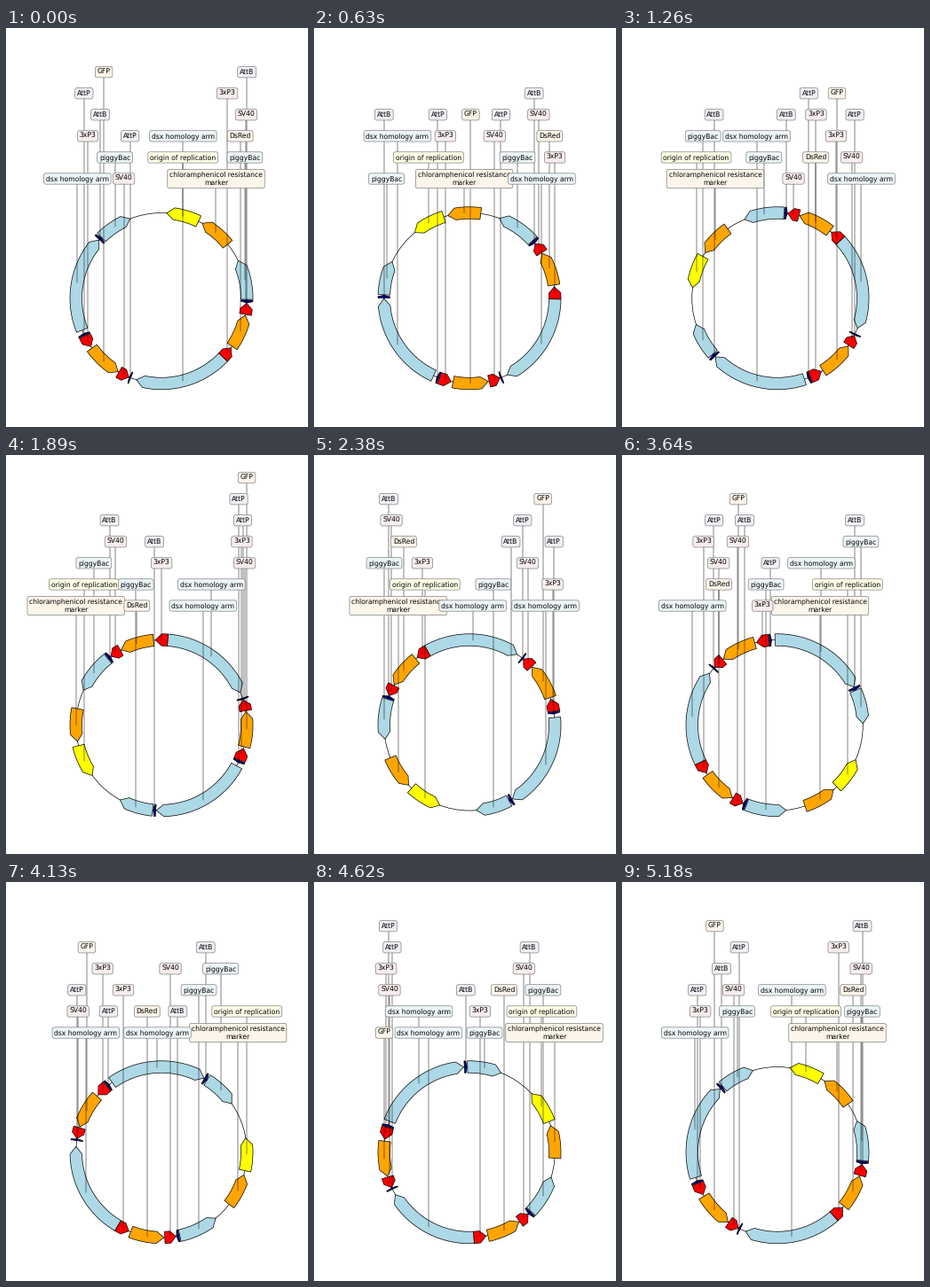
These frames come from a looping animation (340 px wide and 450 px high, 5.25 s). A matplotlib script:

```python
import colorsys

import matplotlib.pyplot as plt
import numpy as np
from matplotlib.animation import FuncAnimation
from matplotlib.colors import to_rgb
from matplotlib.patches import Circle, Polygon

plt.rcParams["text.hinting"] = "no_hinting"

FRAMES, INTERVAL = 75, 70
SCALE = 96.25                 # pixels per plasmid radius
X0, Y0 = 175, 208.5           # pixel position of the top of the circle
HALF_BAND = 0.07
BASE_Y, ROW_STEP = 0.4, 0.25  # label rows above the circle
FIT, GAP = 0.683, 0.213       # label width factor and spacing for collisions

BACKBONE, GENE, SIGNAL, SITE = "lightblue", "orange", "red", "darkblue"
RESISTANCE = "chloramphenicol resistance\nmarker"

# label, colour, centre angle, half span, side of the tip (+1 = counterclockwise)
FEATURES = [
    ("dsx homology arm", BACKBONE, 169.5, 32.5, -1),
    ("dsx homology arm", BACKBONE, -75.4, 31.6, -1),
    ("piggyBac", BACKBONE, 12.7, 13.5, 1),
    ("GFP", GENE, -132.35, 11.9, 1),
    ("piggyBac", BACKBONE, 123.0, 11.5, -1),
    ("DsRed", GENE, -22.9, 11.4, 1),
    ("origin of replication", "yellow", 75.4, 11.1, 1),
    (RESISTANCE, GENE, 50.3, 11.1, 1),
    ("3xP3", SIGNAL, -39.7, 4.1, 1),
    ("3xP3", SIGNAL, -149.6, 4.1, 1),
    ("SV40", SIGNAL, -116.1, 3.75, 1),
    ("SV40", SIGNAL, -7.2, 3.75, 1),
    ("AttB", SITE, 135.7, 0.9, -1),
    ("AttB", SITE, -2.2, 0.9, -1),
    ("AttP", SITE, -111.6, 0.55, -1),
    ("AttP", SITE, -154.9, 0.75, -1),
]


def polar(r, deg):
    a = np.deg2rad(deg)
    return np.column_stack([r * np.cos(a), r * np.sin(a) - 1])


def arrow(center, half, side):
    """Outline of a curved arrow on the circle."""
    tip = center + side * half
    neck = tip - side * min(5, half)
    arc = np.linspace(center - side * half, neck, 40)
    return np.vstack([
        polar(1 + HALF_BAND, arc),
        polar(1, np.array([tip])),
        polar(1 - HALF_BAND, arc[::-1]),
    ])


def pale(color):
    """Very light tint, greyer for dark colours."""
    rgb = to_rgb(color)
    luma = np.dot(rgb, (0.3, 0.59, 0.11))
    h, _, s = colorsys.rgb_to_hls(*rgb)
    return colorsys.hls_to_rgb(h, 0.95, s * (0.2 + 0.8 * luma))


class Feature:
    def __init__(self, ax, label, color, angle, half, side):
        self.label, self.angle, self.half, self.side = label, angle, half, side
        self.patch = ax.add_patch(Polygon(
            arrow(angle, half, side), facecolor=color, edgecolor="k", lw=1, zorder=1))
        self.link, = ax.plot([], [], color="k", lw=0.7, zorder=2)
        self.text = ax.text(
            0, 0, label, fontsize=11, family="DejaVu Sans",
            ha="center", va="center",
            bbox=dict(boxstyle="round", fc=pale(color), ec="0.5", lw=1))
        self.width = self.text.get_window_extent().width / SCALE

    def turn(self, shift):
        a = self.angle + shift
        self.patch.set_xy(arrow(a, self.half, self.side))
        self.x, self.y = polar(1, np.array([a]))[0]

    def hits(self, other):
        room = FIT * (self.width + other.width) / 2 + GAP
        return abs(self.x - other.x) < room

    def place(self, row):
        top = BASE_Y + ROW_STEP * row
        self.text.set_position((self.x, top))
        self.link.set_data([self.x, self.x], [top, self.y])


fig = plt.figure(figsize=(6.8, 9), dpi=50, facecolor="white")
ax = fig.add_axes([0, 0, 1, 1])
ax.set_xlim(-X0 / SCALE, (340 - X0) / SCALE)
ax.set_ylim((Y0 - 450) / SCALE, Y0 / SCALE)
ax.axis("off")
ax.add_patch(Circle((0, -1), 1, facecolor="none", edgecolor="k", lw=1, zorder=1))

features = [Feature(ax, *f) for f in FEATURES]
widths = {f.label: f.width for f in features}
for order, f in enumerate(sorted(features, key=lambda f: -f.width)):
    f.text.set_zorder(3 + order / 100)


def priority(f):
    # equal arms: the one nearer the middle goes lower
    tie = abs(f.x) if f.label.startswith("dsx") else 0
    return -widths[f.label], tie


def update(i):
    for f in features:
        f.turn(360 * i / FRAMES)
    rows = []
    for f in sorted(features, key=priority):
        row = 0
        while row < len(rows) and any(f.hits(g) for g in rows[row]):
            row += 1
        if row == len(rows):
            rows.append([])
        rows[row].append(f)
        f.place(row)
    return []


anim = FuncAnimation(fig, update, frames=FRAMES, interval=INTERVAL,
                     repeat=True, repeat_delay=0, blit=False)
plt.show()
```
